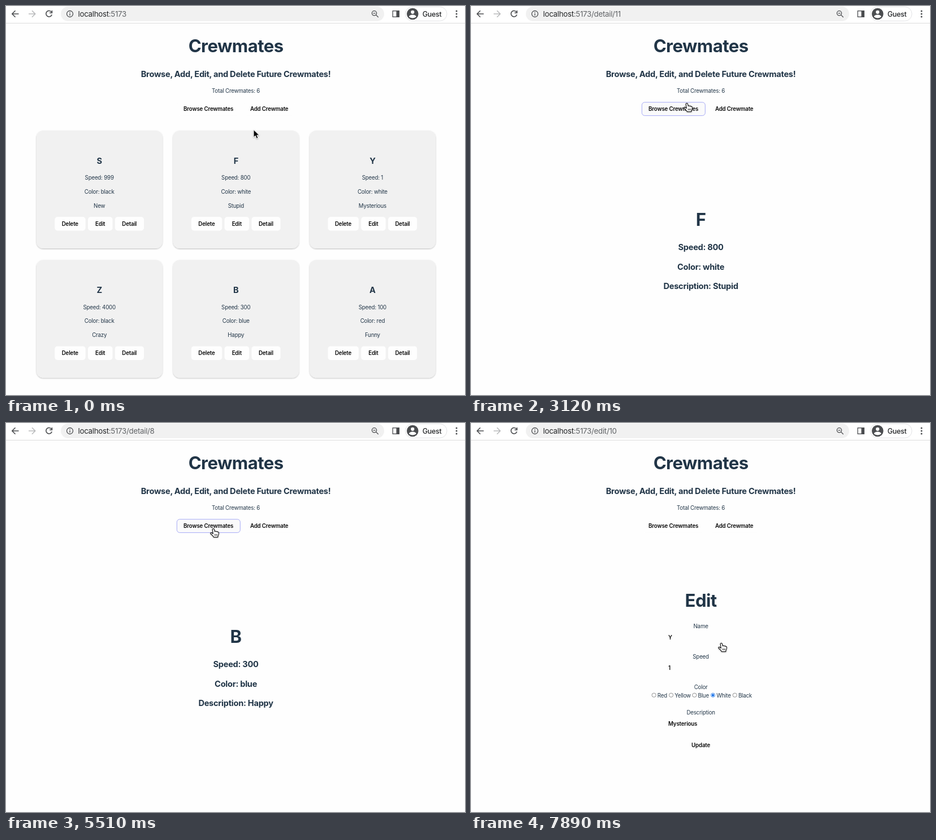
Recreate the animation shown at these times as an HTML page. Size 812 by 690 pixels, loop 8 s.

```html
<!DOCTYPE html>
<html lang="en">
<head>
<meta charset="utf-8">
<title>Crewmates</title>
<style>
html, body { margin: 0; width: 100%; height: 100%; overflow: hidden; background: #fefefe; }
svg { display: block; width: 100%; height: 100%; }
text { font: 9.7px Inter, "Liberation Sans", sans-serif; font-optical-sizing: none; letter-spacing: -.018em; fill: #213547; }
.mid { text-anchor: middle; }
.h1 { font-size: 31.1px; font-weight: 700; }
.h2 { font-size: 14.6px; font-weight: 700; }
.btn { font-weight: 600; letter-spacing: -.015em; fill: #080808; }
.url { font-size: 13.3px; letter-spacing: -.021em; fill: #606366; }
.host { fill: #242628; }
.guest { font-size: 12.4px; font-weight: 500; fill: #242628; }
.icon { fill: none; stroke: #4b4d50; stroke-width: 1.6; }
.thin { stroke-width: 1.3; }
.dark { fill: #4b4d50; }
.light { fill: #fefefe; }
</style>
</head>
<body>
<svg viewBox="0 0 812 690">
  <defs>
    <filter id="soft" x="-10%" y="-10%" width="120%" height="120%">
      <feDropShadow dx="0" dy="1" stdDeviation=".8" flood-opacity=".27"/>
    </filter>
    <filter id="lift" x="-50%" y="-50%" width="200%" height="200%">
      <feDropShadow dx="0" dy="1" stdDeviation=".8" flood-opacity=".35"/>
    </filter>
  </defs>
  <rect class="light" width="812" height="690"/>
  <rect width="812" height="30" fill="#fff"/>
  <path d="M0 30.5H812" stroke="#dcdcdc"/>
  <rect x="97" y="1" width="572" height="26" rx="13" fill="#f1f1f1"/>
  <g class="icon">
    <path d="M22.5 14H11M16.5 8.3L10.8 14L16.5 19.7"/>
    <path d="M40 14H51.5M46 8.3L51.7 14L46 19.7" stroke="#b9babc"/>
    <path d="M80.5 10.7A5.3 5.3 0 1 0 81.2 15.3M81.4 8V12.3H77"/>
    <g class="thin">
      <circle cx="113" cy="14" r="5.5"/>
      <path d="M113 13.3V17M113 10.8V12.2"/>
      <circle cx="651.5" cy="12.8" r="4.1"/>
      <path d="M654.6 15.9L658.7 20M649.5 12.8H653.5"/>
      <rect x="684.2" y="8.7" width="11.2" height="10.6"/>
    </g>
  </g>
  <rect class="dark" x="690.5" y="8" width="5.5" height="12"/>
  <rect x="706.5" y="1.5" width="73.5" height="25" rx="12.5" fill="#fff" stroke="#e2e3e5"/>
  <circle class="dark" cx="719.3" cy="14" r="10.3"/>
  <circle class="light" cx="719.3" cy="10.8" r="3.1"/>
  <path class="light" d="M713 19.2C713 14.4 725.6 14.4 725.6 19.2Q719.3 24 713 19.2Z"/>
  <text class="guest" x="736.8" y="18.5">Guest</text>
  <path d="M797 9V20" stroke="#4b4d50" stroke-width="3" stroke-linecap="round" stroke-dasharray="0 5"/>
  <g id="page"></g>
  <g id="cursor"></g>
</svg>
<script>
const LOOP = 8000, STEP = 148.9, MID = 406.6;
const crew = [
  ["S", 999, "black", "New"], ["F", 800, "white", "Stupid"], ["Y", 1, "white", "Mysterious"],
  ["Z", 4000, "black", "Crazy"], ["B", 300, "blue", "Happy"], ["A", 100, "red", "Funny"]
];
// Each page shows from step "at"; ring marks the clicked Browse button.
const scenes = [
  { at: 0, path: "", body: list },
  { at: 11, path: "/detail/11", body: () => detail(crew[1]) },
  { at: 23, path: "", ring: true, body: list },
  { at: 30, path: "/detail/8", body: () => detail(crew[4]) },
  { at: 39, path: "", ring: true, body: list },
  { at: 49, path: "/edit/10", body: () => edit(crew[2]) }
];
// Cursor sweeps: each bends towards "via" and starts where the last one ended.
const moves = [
  { from: 3, to: 10, via: [414, 300], end: [451, 387], hand: true },
  { from: 16, to: 21, via: [430, 215], end: [382, 172], hand: true },
  { from: 24, to: 29, via: [390, 330], end: [461.5, 607] },
  { from: 32, to: 37, via: [385, -30], end: [367, 187], hand: true },
  { from: 40, to: 48, via: [562, 386], end: [650, 384], hand: true },
  { from: 51, to: 53, via: [540, 382], end: [443, 390], hand: true }
];
moves.forEach((m, i) => m.start = i ? moves[i - 1].end : [438, 219.5]);

const arrow = `<path filter="url(#lift)" d="M0 0V13.5L3.2 10.6L5.4 15.7L8 14.6L5.8 9.7H10Z" stroke="#fff"/>`;
const hand = `<g filter="url(#lift)" stroke="#111" stroke-width="1.1" stroke-linejoin="round">
  <path d="M-1.8 1.8C-1.8 0 .9 0 1.3 1.6L2.3 5.7Q3.8 3.7 5 5.9Q6.7 4.5 7.5 6.5Q9.5 5.9 9.4 8.2C9.4 11.5 7.7 12.2 7.7 15.5H.5C-.5 12.5 -3.3 11.6 -5 9.1C-5.9 7.6 -3.9 6.8 -2.7 8L-.7 9.5Z" fill="#fff"/>
  <path d="M2.3 10V13.2M4.3 10V13.2M6.2 10V13.2" stroke-width=".8"/></g>`;

const page = document.getElementById("page"), cursor = document.getElementById("cursor");
let mouse;

const text = (s, x, y, cls = "") => `<text class="${cls}" x="${x}" y="${y}">${s}</text>`;
const mid = (s, y, cls = "", x = MID) => text(s, x, y, "mid " + cls);
const lines = (rows, y, gap, cls, x) => rows.map((s, i) => mid(s, y + i * gap, cls, x)).join("");

function button(label, x, y, w, h, ring) {
  const over = mouse.x >= x && mouse.x <= x + w && mouse.y >= y && mouse.y <= y + h;
  const line = ring ? "#1b68c9" : over ? "#a6a9f5" : "none";
  return `<rect x="${x}" y="${y}" width="${w}" height="${h}" rx="5" fill="${over ? "#fafafb" : "#fefefe"}" stroke="${line}" stroke-width="${ring ? 1.7 : 1}"/>`
    + mid(label, y + h / 2 + 3.8, "btn", x + w / 2 - .1);
}

function list() {
  return crew.map(([name, speed, color, mood], i) => {
    const x = 54 + i % 3 * 241.6, y = 221 + Math.floor(i / 3) * 229.4, c = x + 111.2;
    return `<rect x="${x}" y="${y}" width="222.6" height="209" rx="12" fill="#f1f1f1" filter="url(#soft)"/>`
      + mid(name, y + 58.6, "h2", c)
      + lines(["Speed: " + speed, "Color: " + color, mood], y + 87.3, 24.75, "", c)
      + button("Delete", c - 79, y + 153, 54.5, 24.5)
      + button("Edit", c - 20.2, y + 153, 43.6, 24.5)
      + button("Detail", c + 27.6, y + 153, 51.2, 24.5);
  }).join("");
}

function detail([name, speed, color, mood]) {
  return mid(name, 389.5, "h1")
    + lines(["Speed: " + speed, "Color: " + color, "Description: " + mood], 433, 34.5, "h2");
}

function radio(label, x, on) {
  const dot = (r, style) => `<circle cx="${x}" cy="482.7" r="${r}" ${style}/>`;
  return dot(3.6, `fill="#fff" stroke="${on ? "#1670e8" : "#777"}" stroke-width=".8"`)
    + (on ? dot(2.2, 'fill="#1670e8"') : "") + text(label, x + 6.2, 486.5);
}

function edit([name, speed, color, mood]) {
  const colors = { Red: 323.6, Yellow: 354, Blue: 395.3, White: 428, Black: 466.7 };
  return mid("Edit", 326.2, "h1")
    + lines(["Name", "Speed", "Color"], 364.2, 53.9)
    + [name, speed].map((s, i) => text(s, 349, 384 + i * 53.9, "btn")).join("")
    + Object.entries(colors).map(([c, x]) => radio(c, x, c.toLowerCase() === color)).join("")
    + mid("Description", 516.5) + text(mood, 349, 536.5, "btn")
    + mid("Update", 575.3, "btn");
}

function cursorAt(n, scene) {
  const m = moves.findLast(m => m.from < n) || moves[0];
  const t = Math.min(1, Math.max(0, (n - m.from) / (m.to - m.from)));
  const p = 1 - (1 - t) ** 2, q = 1 - p;
  const [x, y] = [0, 1].map(k => q * q * m.start[k] + 2 * p * q * m.via[k] + p * p * m.end[k]);
  // The hand stays until the page under it is replaced.
  return { x, y, hand: m.hand && p > .95 && (scene.ring || scene.at <= m.to) };
}

function draw(n) {
  const scene = scenes.findLast(s => s.at <= n);
  mouse = cursorAt(n, scene);
  page.innerHTML =
    `<text class="url" x="127.5" y="18.6"><tspan class="host">localhost</tspan>:5173${scene.path}</text>`
    + mid("Crewmates", 82.1, "h1")
    + mid("Browse, Add, Edit, and Delete Future Crewmates!", 125.6, "h2")
    + mid("Total Crewmates: 6", 154.4)
    + button("Browse Crewmates", 302.3, 170.8, 112, 23.6, scene.ring)
    + button("Add Crewmate", 420, 170.8, 91.6, 23.6)
    + scene.body();
  cursor.innerHTML = mouse.hand ? hand : arrow;
  cursor.setAttribute("transform", `translate(${mouse.x} ${mouse.y})`);
}

let shown = -1;
function tick() {
  const n = Math.floor((performance.now() % LOOP + 8) / STEP);
  if (n !== shown) draw(shown = n);
  requestAnimationFrame(tick);
}
tick();
</script>
</body>
</html>
```
